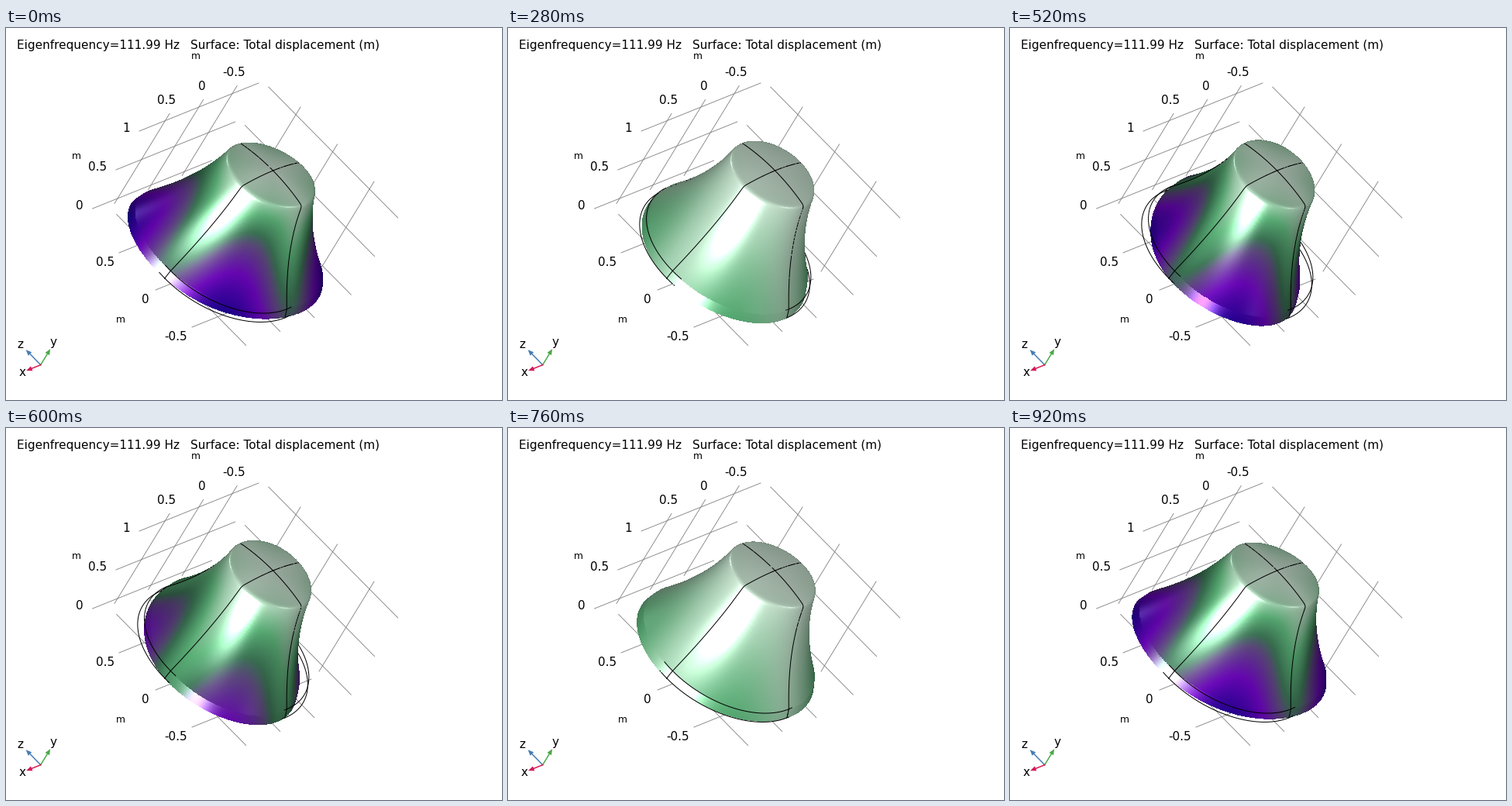
Animation of 640x480 px, one loop 960 ms. Source, as a matplotlib script:

```python
import numpy as np
import matplotlib.pyplot as plt
from matplotlib.animation import FuncAnimation

W, H, DPI = 640, 480, 100
PX = 72 / DPI
STEPS, INTERVAL = 24, 40

# ---------- view: world x, y, z -> screen x, screen y, depth ----------
VIEW = np.array([[-88, 36, .746], [60, -100, .581], [-94.5, -96, -.326]])
ORIGIN = np.array([279.6, 292.3, 0])
EYE = VIEW[:, 2]

# ---------- bell shape ----------
TOP, SHOULDER, LIP = 1.083, 1.035, .085
R_RIM, R_LIP = .85, .822
N_CAP, N_WALL, N_LIP, N_ANG = 120, 280, 50, 1300
RADIAL, AXIAL = .121, .054


def wall_radius(y):
    t = y - LIP
    return R_LIP - .68 * t + .275 * t ** 2


def smooth(col, half=18, sigma=6):
    k = np.exp(-.5 * (np.arange(-half, half + 1) / sigma) ** 2)
    padded = np.pad(col, half, mode="reflect", reflect_type="odd")
    return np.convolve(padded, k / k.sum(), mode="valid")


def build_profile():
    """Radius and height from the domed top over a round shoulder to the rim."""
    r_cap = np.linspace(.002, wall_radius(SHOULDER), N_CAP)
    y_cap = TOP - (TOP - SHOULDER) * (r_cap / r_cap[-1]) ** 2
    y_wall = np.linspace(SHOULDER, LIP, N_WALL)
    radius = smooth(np.r_[r_cap, wall_radius(y_wall)])
    height = smooth(np.r_[y_cap, y_wall])
    return (np.r_[radius, np.linspace(R_LIP, R_RIM, N_LIP)],
            np.r_[height, np.linspace(LIP, 0, N_LIP)])


RAD, HEIGHT = build_profile()
AMP = (1 - HEIGHT / 1.2) * np.minimum(1, RAD / .4)
ANG = np.linspace(0, 2 * np.pi, N_ANG, endpoint=False)

# row neighbours; the lip keeps its own normals so its edge stays sharp
N_BODY = N_CAP + N_WALL
ROWS = np.arange(N_BODY + N_LIP)
PREV, NEXT = np.maximum(ROWS - 1, 0), np.minimum(ROWS + 1, ROWS[-1])
PREV[N_BODY], NEXT[N_BODY - 1] = N_BODY, N_BODY - 1

# ---------- colours and light ----------
RAMP = [(0, "#e4fbea"), (.12, "#afe1be"), (.25, "#5fb97d"), (.4, "#3e7a58"),
        (.5, "#5f4b82"), (.72, "#6c05be"), (1, "#1e0096")]
LEVELS = [level for level, _ in RAMP]
COLOURS = np.array([plt.matplotlib.colors.to_rgb(c) for _, c in RAMP])
SIDE_LIGHT = np.array([.99, 0, -.13])
# half vector, sharpness, strength
GLOSS = [((.93, .27, -.25), 42, .8), ((.5, .72, .48), 90, .35),
         ((.3, .72, -.62), 90, .2)]


def deform(c):
    s2, c2 = np.sin(2 * ANG), np.cos(2 * ANG)
    g = c * AMP[:, None]
    r = RAD[:, None] + RADIAL * g * s2
    t = RADIAL / 2 * g * c2
    x = r * np.cos(ANG) - t * np.sin(ANG)
    z = r * np.sin(ANG) + t * np.cos(ANG)
    y = HEIGHT[:, None] + AXIAL * g * s2
    return np.stack([x, y, z], -1)


def shade(n, level):
    base = np.stack([np.interp(level, LEVELS, ch) for ch in COLOURS.T], -1)
    light = (.5 + .28 * np.clip(n @ EYE, 0, 1)
             + .22 * np.clip(n @ SIDE_LIGHT, 0, 1))
    rgb = base * light[:, None]
    for half, power, gain in GLOSS:
        rgb += gain * np.clip(n @ np.array(half), 0, 1)[:, None] ** power
    return np.clip(rgb, 0, 1)


def pixel_index(scr):
    return scr[..., 1].astype(int) * W + scr[..., 0].astype(int)


def ring(radius, height, angle):
    x, y, z = np.broadcast_arrays(radius * np.cos(angle), height,
                                  radius * np.sin(angle))
    return np.stack([x, y, z], -1)


# undeformed outline: four meridians and the two lip circles
AROUND = np.linspace(0, 2 * np.pi, 700)
EDGES = [ring(RAD, HEIGHT, k * np.pi / 2) for k in range(4)]
EDGES += [ring(R_LIP, LIP, AROUND), ring(R_RIM, 0, AROUND)]


def render(c):
    """Return the bell image and the visible part of each outline."""
    pts = deform(c)
    scr = (pts @ VIEW + ORIGIN).reshape(-1, 3)
    depth = scr[:, 2]
    order = np.argsort(depth)
    winner = np.full(W * H, -1)
    winner[pixel_index(scr)[order]] = order
    hit = np.nonzero(winner >= 0)[0]
    i, j = np.divmod(winner[hit], N_ANG)

    n = np.cross(pts[NEXT[i], j] - pts[PREV[i], j],
                 pts[i, (j + 1) % N_ANG] - pts[i, j - 1])
    n /= np.linalg.norm(n, axis=1, keepdims=True)
    n *= np.where(n @ EYE < 0, -1, 1)[:, None]

    peak = np.hypot(RADIAL, AXIAL)
    size = np.hypot(peak * np.sin(2 * ANG[j]), RADIAL / 2 * np.cos(2 * ANG[j]))
    level = abs(c) * AMP[i] * size / peak

    img = np.zeros((W * H, 4))
    img[hit, :3] = shade(n, level)
    img[hit, 3] = 1
    zbuf = np.full(W * H, -9.)
    zbuf[hit] = depth[winner[hit]]

    paths = []
    for edge in EDGES:
        p = edge @ VIEW + ORIGIN
        seen = p[:, 2] + .009 > zbuf[pixel_index(p)]
        paths.append(np.where(seen[:, None], p[:, :2], np.nan))
    return (img * 255).round().astype(np.uint8).reshape(H, W, 4), paths


# the swing is symmetric in time, so half a cycle is enough
POSES = [render(np.cos(2 * np.pi * k / STEPS)) for k in range(STEPS // 2 + 1)]

# ---------- stage ----------
fig = plt.figure(figsize=(W / DPI, H / DPI), dpi=DPI, facecolor="white")
ax = fig.add_axes([0, 0, 1, 1])
ax.axis("off")


def label(x, y, text, size=15.25, ha="center"):
    ax.text(x, y, text, fontsize=size * PX, family="DejaVu Sans",
            color="black", ha=ha, va="baseline")


def grid(start, span, shift, names=(), offset=(0, 0), lean=0):
    """Three parallel lines, with tick names set off from their starts."""
    ends = [(start[0] + k * shift[0], start[1] + k * shift[1])
            for k in range(3)]
    for x, y in ends:
        ax.plot([x, x + span[0]], [y, y + span[1]], color="#808080",
                lw=.85 * PX, zorder=1)
    for (x, y), name in zip(ends, names):
        label(x + offset[0] - lean * 3.7 * len(name), y + offset[1], name)


ALONG_X, ALONG_Y, ALONG_Z = (154, -62), (-71, 116), (167, 169)
TICKS = ("0.5", "0", "-0.5")
grid((172, 133), ALONG_X, (-30.2, 50), ("1", "0.5", "0"), (-12.7, .5), 1)
grid((211, 110.5), ALONG_Y, (43.6, -18), TICKS, (-1.3, -12.2), .2)
grid((146, 290), ALONG_X, (47, 48), TICKS, (-10.3, 17), .7)
grid((338.7, 76), ALONG_Z, (-30.2, 49.6))
grid((380, 102), ALONG_Y, (47.5, 48))
grid((142.7, 240.5), ALONG_Z, (44, -18))

label(13.6, 26.7, "Eigenfrequency=111.99 Hz", ha="left")
label(237.6, 26.7, "Surface: Total displacement (m)", ha="left")
for x, y in [(244.8, 40), (90.8, 169), (147.8, 380)]:
    label(x, y, "m", 12.3)


def arrow(tip, colour, name, at):
    base, tip = np.array([44.7, 434.7]), np.array(tip)
    d = (tip - base) / np.linalg.norm(tip - base)
    side = np.array([-d[1], d[0]]) * 3.2
    neck = tip - 7.5 * d
    ax.plot(*zip(base, neck), color=colour, lw=1.5 * PX, zorder=2)
    ax.fill(*zip(tip, neck + side, neck - side), color=colour, lw=0, zorder=2)
    label(*at, name)


arrow((25.7, 415.2), "#467db4", "z", (18.7, 412.7))
arrow((57.2, 414.2), "#4baa46", "y", (61.3, 409.7))
arrow((26.2, 442.2), "#d71955", "x", (21.3, 448.7))

bell = ax.imshow(POSES[0][0], extent=(0, W, H, 0), interpolation="nearest",
                 zorder=3)
edges = [ax.plot([], [], color="black", lw=PX, zorder=4)[0] for _ in EDGES]
ax.set_xlim(0, W)
ax.set_ylim(H, 0)
ax.set_aspect("auto")


def update(k):
    img, paths = POSES[min(k, STEPS - k)]
    bell.set_data(img)
    for line, path in zip(edges, paths):
        line.set_data(path[:, 0], path[:, 1])
    return [bell, *edges]


anim = FuncAnimation(fig, update, frames=STEPS, interval=INTERVAL,
                     repeat=True, repeat_delay=0, blit=False)
plt.show()
```
